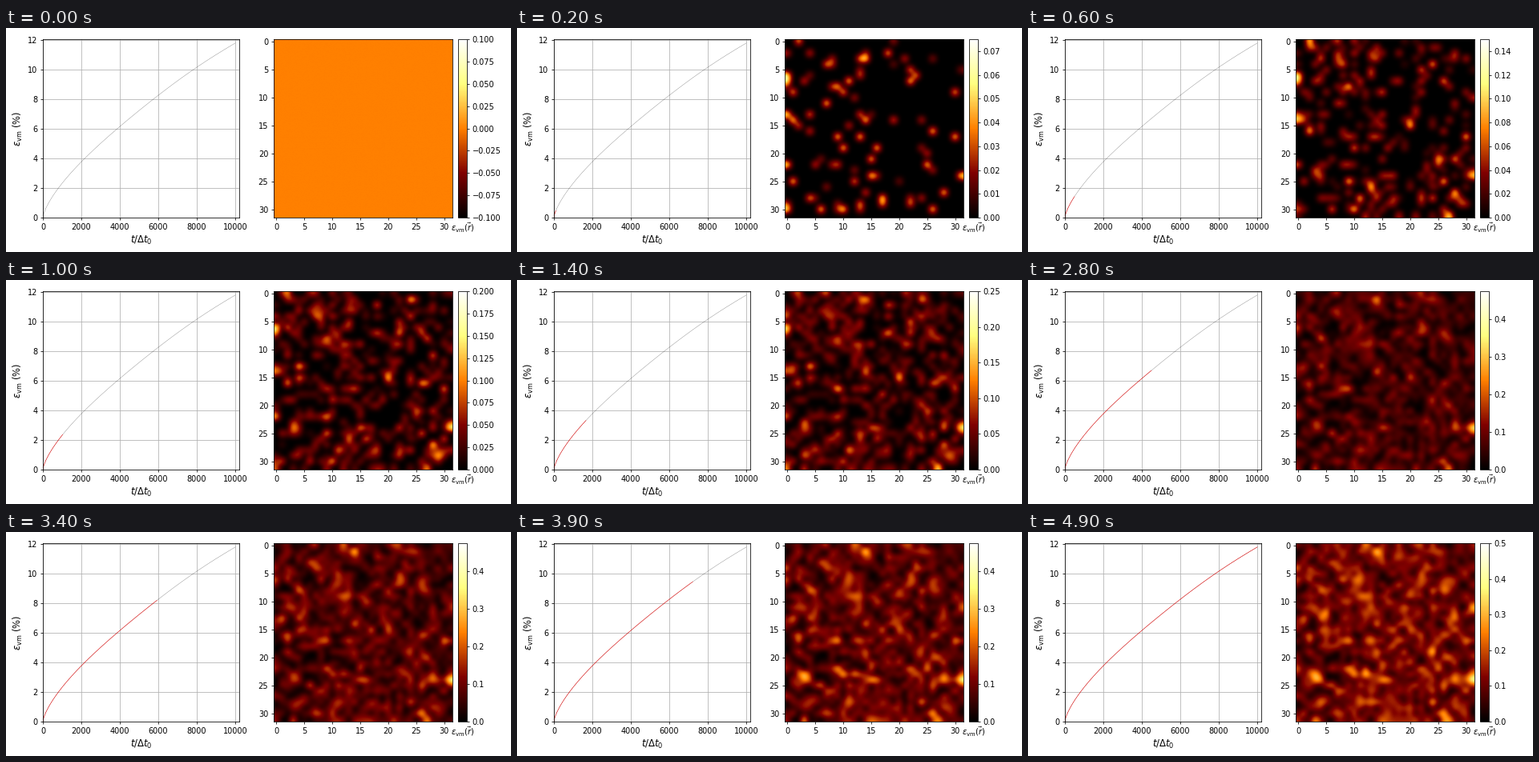
Write a matplotlib script that moves like this. It is 630 px wide and 280 px high and loops after 5 s.

```python
import numpy as np
import matplotlib.pyplot as plt
from matplotlib.animation import FuncAnimation

W, H, DPI = 630, 280, 70
FRAMES, INTERVAL = 50, 100
N = 32           # map cells per side
T_END = 10000
EVENT = 0.05     # mean strain released by one local event

# Weak cells (column, row) that yield more often than the rest
WEAK_CELLS = [(19, 19), (31, 24), (0, 31), (24, 19), (12, 0), (25, 3), (30, 26), (9, 17)]


def strain(t):
    """Global strain in percent: a power law with a slight late bulge."""
    u = np.asarray(t) / T_END
    return 11.8 * u ** 0.705 - 0.11 * u * np.sin(2 * np.pi * u)


def time_at(k):
    return T_END * (k / (FRAMES - 1)) ** 1.43


def scale_at(k):
    """Colour maximum, rising in steps of 0.025."""
    trend = np.interp(k, [0, 6, 12, 21, 28, 42, 46],
                      [0.05, 0.15, 0.25, 0.325, 0.475, 0.475, 0.5])
    return 0.025 * np.floor(trend / 0.025 + 1e-6)


def events_until(t):
    return int(strain(t) / 100 * N * N / EVENT)


rng = np.random.default_rng(12)
rate = np.ones((N, N))
for col, row in WEAK_CELLS:
    rate[row, col] = 3
cells = rng.choice(N * N, size=events_until(T_END), p=(rate / rate.sum()).ravel())
releases = EVENT * rng.uniform(0.4, 1.6, cells.size)


def field_at(k):
    count = events_until(time_at(k))
    field = np.bincount(cells[:count], releases[:count], N * N).reshape(N, N)
    return np.minimum(field, 0.9 * scale_at(k))


fig = plt.figure(figsize=(W / DPI, H / DPI), dpi=DPI, facecolor="white")


def add_axes(x, width):
    return fig.add_axes([x / W, 43 / H, width / W, 223 / H])


plot_ax = add_axes(46, 245)
map_ax = add_axes(334, 223)
bar_ax = add_axes(564, 11)

times = np.linspace(0, T_END, 1001)
plot_ax.plot(times, strain(times), color="black", lw=0.2)
progress, = plot_ax.plot([], [], color="red", lw=0.5)
plot_ax.set(xlim=(0, 10205), ylim=(0, 12.06),
            xticks=range(0, T_END + 1, 2000), yticks=range(0, 13, 2))
plot_ax.grid(True)
plot_ax.set_xlabel(r"$t/\Delta t_0$", fontsize=12)
plot_ax.set_ylabel(r"$\varepsilon_{\mathrm{vm}}$ (%)", fontsize=12)

image = map_ax.imshow(field_at(0), cmap="afmhot", interpolation="bicubic", vmin=-0.1, vmax=0.1)
map_ax.set(xticks=range(0, N, 5), yticks=range(0, N, 5))
fig.colorbar(image, cax=bar_ax)
bar_ax.set_xlabel(r"$\varepsilon_{\mathrm{vm}}(\vec{r})$", fontsize=10)


def update(k):
    now = time_at(k)
    shown = np.append(times[times < now], now)
    progress.set_data(shown, strain(shown))
    image.set_data(field_at(k))
    # The undeformed start has no range of its own, so it is centred on zero
    image.set_clim(*((0, scale_at(k)) if k else (-0.1, 0.1)))
    return progress, image


anim = FuncAnimation(fig, update, frames=FRAMES, init_func=lambda: update(0),
                     interval=INTERVAL, repeat=True, repeat_delay=0, blit=False)
plt.show()
```
